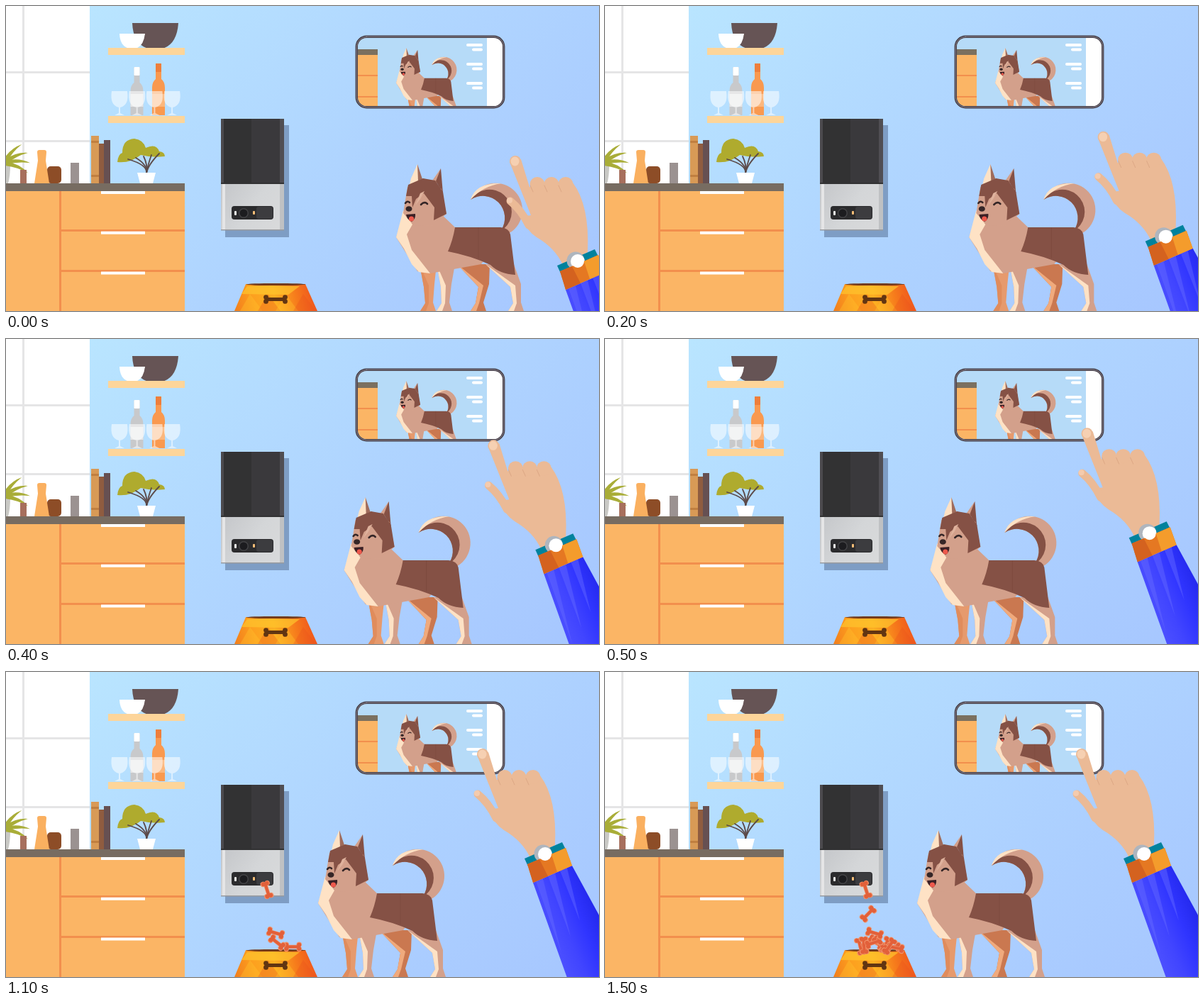
Animation, 836 px wide and 430 px high, one loop 3.5 s. Source, as an HTML page with a canvas:

```html
<!DOCTYPE html>
<html lang="en">
<head>
<meta charset="utf-8">
<title>Pet feeder</title>
<style>
html, body { margin: 0; width: 100%; height: 100%; overflow: hidden; }
canvas { display: block; width: 836px; height: 430px; }
</style>
</head>
<body>
<canvas id="stage" width="836" height="430"></canvas>
<script>
const LOOP = 3500, STEP = 100, MOVE_STEPS = 6;
const FIRST_BONE = 7, PILE_START = 10, LAST_STEP = 15;
const TAN = '#d3a08b', DARK = '#855145', CREAM = '#fee2c5', INK = '#352627';
const ORANGE = '#fbb565', SEAM = '#f28f4d', SKIN = '#ebba96', BRANCH = '#5c4a48';

const screen = document.getElementById('stage').getContext('2d');
let c = screen;

function fill(color, d) {
  c.fillStyle = color;
  c.fill(new Path2D(d));
}
function line(color, width, d) {
  c.strokeStyle = color;
  c.lineWidth = width;
  c.lineCap = c.lineJoin = 'round';
  c.stroke(new Path2D(d));
}
function rect(color, x, y, w, h, r = 0) {
  c.fillStyle = color;
  c.beginPath();
  c.roundRect(x, y, w, h, r);
  c.fill();
}
function oval(color, x, y, rx, ry = rx) {
  c.fillStyle = color;
  c.beginPath();
  c.ellipse(x, y, rx, ry, 0, 0, Math.PI * 2);
  c.fill();
}
function ramp(x0, y0, x1, y1, ...colors) {
  const g = c.createLinearGradient(x0, y0, x1, y1);
  colors.forEach((color, i) => g.addColorStop(i / (colors.length - 1), color));
  return g;
}
function at(x, y, draw, turn = 0) {
  c.save();
  c.translate(x, y);
  c.rotate(turn * Math.PI / 180);
  draw();
  c.restore();
}

function wall() {
  rect(ramp(60, 60, 633, 633, '#b9e5ff', '#afd4ff', '#a6c6ff'), 0, 0, 836, 430);
  rect('#fff', 0, 0, 118, 251);
  for (const y of [92, 189]) rect('#e5e5e6', 0, y, 118, 3);
  rect('#e5e5e6', 23, 0, 3, 251);
}

function dish(color, x, y, w, h) {
  fill(color, `M${x} ${y}h${w}q-2 ${h * .8} ${-w * .3} ${h}h${-w * .4}q${-w * .28} ${-h * .2} ${-w * .3} ${-h}Z`);
}
function bottle(color, cap, label, x, top) {
  fill(color, `M${x - 4} ${top}h8v22q5 4 5 12V154h-18V${top + 34}q0 -8 5 -12Z`);
  rect(cap, x - 4, top, 8, 12, 1);
  rect(label, x - 9, 124, 18, 18);
}
function glass(x) {
  fill('#ffffff8c', `M${x - 11} 120h22q3 20 -10 23v8l6 3h-14l6 -3v-8q-13 -3 -10 -23Z`);
}
function shelves() {
  dish('#665455', 178, 24, 65, 35);
  dish('#fff', 160, 39, 36, 20);
  bottle('#c8c9cb', '#fff', '#e6e7e8', 184.5, 86);
  bottle('#f9994f', '#ee7e3b', '#fbb77d', 215, 81);
  for (let i = 0; i < 4; i++) glass(160 + 24.7 * i);
  for (const y of [59, 155]) rect('#fdd59a', 144, y, 108, 10);
}

function counter() {
  fill('#c9c9c5', 'M0 222H6Q6 240 3 250H0Z');
  for (let i = 0; i < 4; i++)
    at(-3, 222, () => fill('#a9ad38', 'M0 -3Q20 -9 37 0Q18 -3 0 3Z'), 22 - 23 * i);
  rect('#a76f5d', 20, 231, 9, 19);
  rect('#8d4d27', 58, 226, 20, 24, 5);
  fill('#fab060', 'M44 206Q44 203 47 203H54Q57 203 57 206L56 218 61 250H40L45 218Z');
  rect('#9b9291', 91, 221, 12, 29);
  rect('#d89a56', 120, 183, 11, 67);
  for (const y of [190, 238]) rect('#c07f40', 120, y, 11, 3);
  rect('#8f5c40', 131, 194, 7, 56);
  rect('#665052', 138, 189, 9, 61);

  fill('#afab2e', 'M157 220Q158 209 164 207Q164 188 181 187Q194 189 197 200Q212 193 216 205Q224 206 224 212Q205 214 190 210Q175 222 157 220Z');
  for (let i = 0; i < 5; i++) line(BRANCH, 1.8, `M198 236Q200 224 ${172 + 11 * i} ${216 - 2 * i}`);
  fill('#fff', 'M185 235H211L207 250H189Z');

  rect(ORANGE, 0, 261, 252, 169);
  rect('#776c61', 0, 250, 252, 11);
  rect(SEAM, 75, 261, 3, 169);
  for (let i = 0; i < 3; i++) {
    if (i) rect(SEAM, 77, 258 + 57 * i, 175, 3);
    rect('#fff', 134, 261 + 56.7 * i, 62, 4);
  }
}

function feeder() {
  rect('#7e9dc4', 309, 168, 90, 158);
  rect('#323233', 303, 159, 89, 92);
  rect('#3a393c', 346, 159, 40, 90);
  rect('#4c4a4e', 303, 159, 4, 90);
  rect('#504e53', 386, 159, 6, 90);
  rect(ramp(303, 251, 392, 316, '#c4c6c9', '#d4d6d8', '#d9dadb'), 303, 251, 89, 65);
  rect('#e5e5e6', 305, 251, 4, 65);
  rect('#bfc1c3', 386, 251, 6, 65);
  rect('#999b9f', 303, 315, 89, 1.5);
  rect('#2b2b2d', 318, 282, 59, 19, 4);
  rect('#3c3c3f', 353, 283, 23, 17, 3);
  rect('#f1f1ee', 322, 289, 3, 6, 1);
  rect('#f4bd76', 348, 289, 3, 5, 1);
  oval('#434346', 335, 292, 7);
  oval('#1c1c1f', 335, 292, 5.5);
}

function boneShape(color, length, thick, knob) {
  rect(color, -length, -thick / 2, length * 2, thick);
  for (const sx of [-1, 1])
    for (const sy of [-1, 1]) oval(color, sx * length, sy * knob * .85, knob);
}

function bowl() {
  fill(ramp(322, 430, 439, 405, '#f27d1c', '#fda01f', '#fdb022', '#f67a1b', '#ee4f1d'), 'M338 392H422L439 430H322Z');
  fill('#ffc62eb0', 'M340 395H414L398 407 332 406Z');
  for (let i = 0; i < 4; i++) {
    const x = 330 + 25 * i;
    fill(i % 2 ? '#e8501c50' : '#ffc22e60', `M${x} 430l14 -24 18 24Z`);
  }
  oval('#753c1c', 380.5, 392.5, 42, 1.6);
  at(380, 413.5, () => boneShape('#613512', 13.5, 5, 3.4));
}

function tail() {
  fill(TAN, 'M545 273A38 38 0 1 1 600 320L588 316A31 31 0 0 0 545 273Z');
  fill(DARK, 'M545 273A31.5 31.5 0 1 1 592 314L588 316A31 31 0 0 0 545 273Z');
  fill(CREAM, 'M545 273Q552 249 588 250Q562 254 545 273Z');
}

function leg(color, light, hip, half, knee, foot) {
  const front = `M${hip - half} 364L${knee - 7} 396 ${foot - 4} 419 ${foot - 11} 430`;
  fill(color, `${front}H${foot + 11}L${foot + 7} 418 ${knee + 8} 392 ${hip + half} 364Z`);
  fill(light, `${front}H${foot - 3}L${foot + 1} 419 ${knee} 394Z`);
}

function head() {
  fill(CREAM, 'M458 256 461 243 470 223 475 246Z');
  fill('#9f6b5b', 'M470 223 477 244 471 247Z');
  fill(TAN, 'M489 249 503 229 500 250Z');
  fill(DARK, 'M496 247 503 229 506 264Z');
  fill(TAN, 'M456 255 478 243 504 258 511 293 492 309 465 310 450 292Z');
  fill(DARK, 'M457 252 478 243 495 246 506 262 511 293 493 302 494 284 479 264 468 272 463 284 462 268 454 268Z');
  fill('#dfb29d', 'M474 264 480 261 474 272 467 281Z');
  oval(INK, 458, 286, 4.5, 3.8);
  line(INK, 2.6, 'M453 278Q456 274 459 277M475 280Q480 275 484 279');
  fill('#3a2025', 'M454 294 467 293Q468 300 462 304Q455 301 454 294Z');
  oval('#ed594c', 461.5, 300, 3.6);
}

function dog() {
  tail();
  leg('#ca7850', '#f0aa7c', 549, 23, 563, 556);
  leg('#e69a6d', '#e08c5c', 485, 12, 486, 485);
  leg(TAN, CREAM, 510, 13, 510, 508);
  leg(TAN, CREAM, 586, 20, 608, 609);
  fill(TAN, 'M453 286 440 326 470 374 488 377 560 364 585 330 523 312 500 290Z');
  fill(CREAM, 'M450 288 440 326 451 342 462 364 472 375 488 377 462 344 455 322 463 308Z');
  fill(DARK, 'M523 312H587Q599 313 601 322L608 379Q586 378 573 365 545 352 513 346Q520 330 523 312Z');
  line('#754439', .5, 'M556 313V355');
  head();
}

function phone() {
  rect('#fff', 494, 43, 208, 100, 14);
  c.save();
  c.beginPath();
  c.roundRect(496, 45, 204, 96, 12);
  c.clip();
  rect('#b6dbf8', 496, 45, 182, 96);
  rect(ORANGE, 496, 61, 28, 80);
  rect('#7b705f', 496, 61, 28, 8);
  for (const y of [97, 127]) rect(SEAM, 496, y, 28, 2);
  c.translate(338.8, -48);
  c.scale(.48, .48);
  dog();
  c.restore();
  for (let y = 53; y < 120; y += 27) {
    rect('#fff', 649, y, 23, 4, 2);
    rect('#fff', 657, y + 6.5, 15, 4, 2);
  }
  const edge = new Path2D();
  edge.roundRect(494.3, 43.3, 207.4, 99.4, 14);
  for (const [color, width] of [['#443d46', 3.4], ['#aaa2ad', .7]]) {
    c.strokeStyle = color;
    c.lineWidth = width;
    c.stroke(edge);
  }
}

function hand() {
  fill(ramp(760, 360, 830, 330, '#4c50ff', '#4145ff', '#3035ff', '#2429ee'), 'M743 297 798 273 846 361V470H805Z');
  for (let i = 0; i < 3; i++)
    fill('#686cff70', `M${747 + 17 * i} ${295 - 7.5 * i}l10 -4 ${26 - 4 * i} ${105 - 15 * i}Z`);

  fill(SKIN, 'M664 117 680 113 692 152 753 146Q777 178 774 244L739 262Q728 238 702 223 688 214 680 194L694 192Z');
  line(SKIN, 11, 'M665 172Q680 184 691 206');
  oval(SKIN, 672, 116, 8);
  for (let i = 0; i < 3; i++) {
    const x = 703 + 20 * i;
    oval(SKIN, x, 148, 10.5, 10);
    line('#d9a381', .8, `M${x - 10} 150l4 9`);
  }
  oval('#f6d0b2', 671.5, 116, 6, 6.5);
  oval('#f4cbae', 664, 171, 4);

  fill('#00829d', 'M731 263 784 240 790 252 736 274Z');
  oval('#aeb5be', 757, 256, 12.5);
  oval('#fff', 760, 257, 10);
  fill('#e57822', 'M735 271 789 248 798 273 743 297Z');
  fill('#d4621f', 'M735 271 752 264 764 288 743 297Z');
  fill('#f49c2c', 'M769 257 789 248 798 273 777 282Z');
  oval('#fff', 760, 257, 9);
}

function bone(x, y, turn) {
  at(x, y, () => {
    boneShape('#f0936a', 9, 5.4, 3.7);
    boneShape('#e2603a', 9, 4, 3);
  }, turn);
}

// A bone tumbles for three steps, counted by age.
function fallingBone(age) {
  bone(368 + 3 * age ** 2, 307 + 37.5 * age - 3.5 * age ** 2, 72 + 62 * age);
}

// The golden ratio spreads the heap evenly; it is tallest in the middle.
function heapBone(i) {
  const side = (.9 + i * .618) % 1 * 2 - 1;
  bone(381 + 29 * side, 389 - 8 * (1 - Math.abs(side)), 38 * i);
}

function bones(step) {
  const now = Math.min(step, LAST_STEP);
  for (let i = 0; i < 2 * (now - PILE_START); i++) heapBone(i);
  for (let age = 0; age < 3; age++) {
    const start = now - age;
    const released = start % 2 === 1 || start === LAST_STEP - 1;
    if (start >= FIRST_BONE && released) fallingBone(age);
  }
}

// Everything that never moves is painted once.
const scene = document.createElement('canvas');
scene.width = 836;
scene.height = 430;
c = scene.getContext('2d');
[wall, shelves, counter, feeder, bowl, phone].forEach(draw => draw());
c = screen;

function frame() {
  const step = Math.floor(performance.now() % LOOP / STEP);
  const left = 1 - Math.min(step / MOVE_STEPS, 1);
  c.drawImage(scene, 0, 0);
  at(110 * left, 0, dog);
  at(46 * left, 103 * left, hand);
  bones(step);
  requestAnimationFrame(frame);
}
frame();
</script>
</body>
</html>
```
